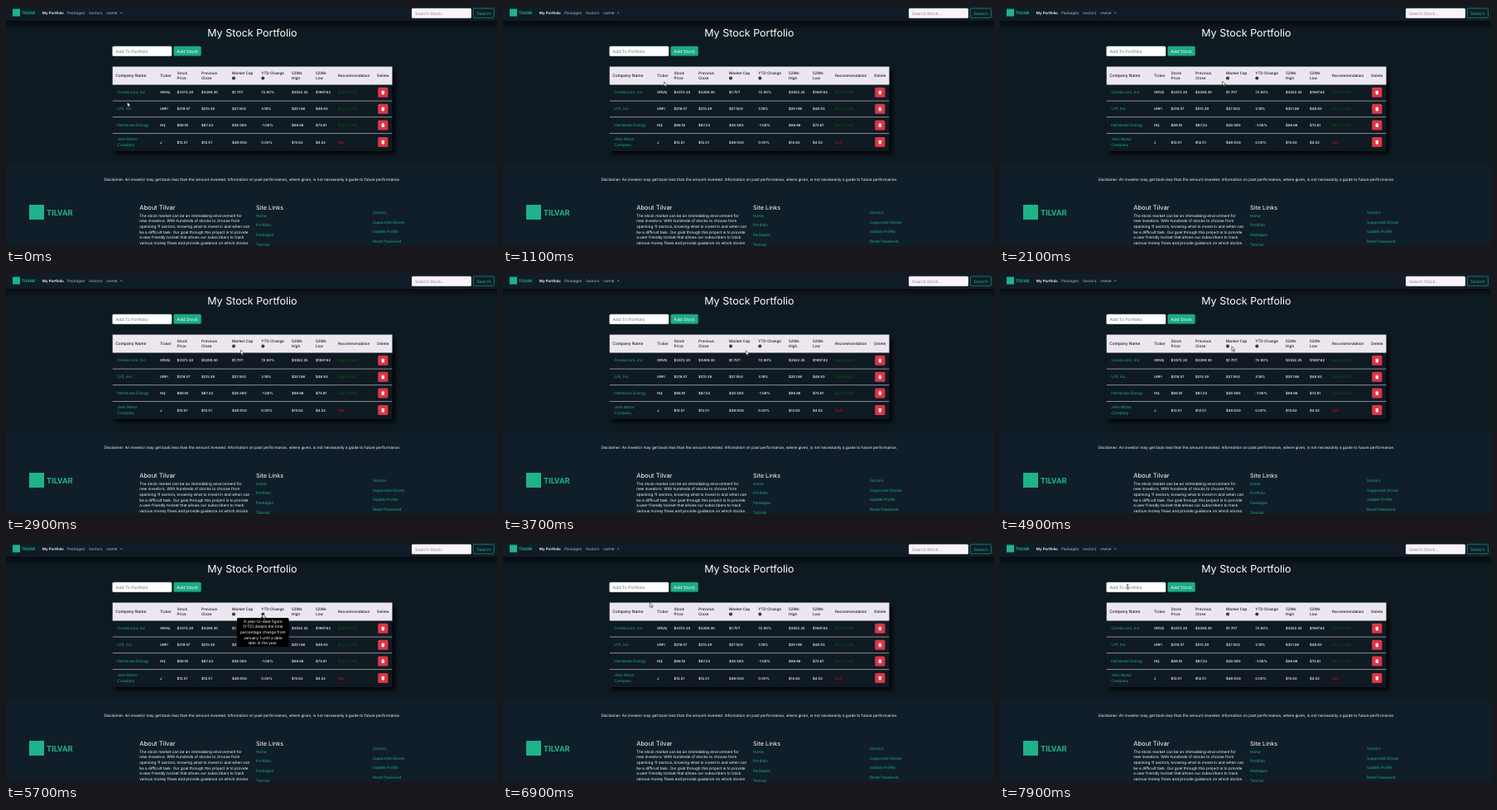
An HTML page that plays this animation: 593x291 px, repeating every 8 s.

```html
<!DOCTYPE html>
<html lang="en">
<head>
<meta charset="utf-8">
<title>My Stock Portfolio</title>
<style>
  html, body { margin: 0; width: 100%; height: 100%; overflow: hidden; background: #0e1a21; }
  svg { display: block; width: 593px; height: 291px; }
  text { font-family: Inter, "Open Sans", sans-serif; text-rendering: geometricPrecision; white-space: pre; }
</style>
</head>
<body>
<svg id="stage" viewBox="0 0 593 291" xmlns="http://www.w3.org/2000/svg">
  <defs>
    <linearGradient id="navShade" x2="0" y2="1">
      <stop offset="0" stop-color="#000" stop-opacity=".6"/>
      <stop offset="1" stop-color="#000" stop-opacity="0"/>
    </linearGradient>
    <filter id="blur" x="-10%" y="-10%" width="120%" height="125%"><feGaussianBlur stdDeviation="2"/></filter>
  </defs>
</svg>
<script>
const stage = document.getElementById('stage');
const GREEN = '#1fb389', WHITE = '#fff', INK = '#17171c', RED = '#dc3545';

function add(tag, attrs, parent = stage) {
  const el = document.createElementNS('http://www.w3.org/2000/svg', tag);
  for (const key in attrs) el.setAttribute(key, attrs[key]);
  parent.appendChild(el);
  return el;
}
const box = (x, y, width, height, fill, rx = 0, extra = {}, parent) =>
  add('rect', { x, y, width, height, fill, rx, ...extra }, parent);
function label(str, x, y, size, fill, extra = {}, parent) {
  const el = add('text', { x, y, 'font-size': size, fill, ...extra }, parent);
  el.textContent = str;
  return el;
}
const bold = weight => ({ 'font-weight': weight });
const centered = { 'text-anchor': 'middle' };

function brand(x, y, side, textX, baseline, size) {
  box(x, y, side, side, GREEN);
  label('TILVAR', textX, baseline, size, GREEN,
    { 'font-weight': 700, style: 'font-family: Roboto, sans-serif' });
}

function drawNav() {
  box(0, 18, 593, 10, 'url(#navShade)');
  box(0, 0, 593, 18, '#101c28');
  brand(8, 3.5, 9, 19, 10.2, 4.9);
  label('My Portfolio', 43.8, 10.4, 4.45, WHITE, bold(600));
  label('Packages', 74, 10.4, 4.6, '#b4bac0');
  label('Sectors', 100, 10.4, 4.5, '#b4bac0');
  label('owner', 121.3, 10.4, 4.7, '#b4bac0');
  add('path', { d: 'M137.8 7.8h2.8l-1.4 1.4z', fill: '#8b939b' });
  box(490, 2.7, 72, 12, '#fbf3fa', 1.5);
  label('Search Stock...', 494, 10.6, 5, '#85818c');
  box(564.3, 2.9, 25.2, 11.4, 'none', 1.5, { stroke: GREEN, 'stroke-width': .6 });
  label('Search', 577, 10.6, 5.3, GREEN, centered);
}

function drawForm() {
  label('My Stock Portfolio', 297.4, 36.8, 12.5, WHITE, centered);
  box(128.5, 48.8, 71.7, 12, WHITE, 1.5);
  label('Add To Portfolio', 132.5, 56.8, 5.15, '#6c757d');
  box(202.5, 48.8, 33.2, 11.8, '#1bab85', 1.5);
  label('Add Stock', 219.1, 56.5, 5.25, WHITE, centered);
}

function infoIcon(x, y) {
  add('circle', { cx: x, cy: y, r: 1.9, fill: INK });
  add('path', { d: `M${x} ${y - 1.2}v.5M${x} ${y - .3}v1.4`, stroke: WHITE, 'stroke-width': .55 });
}

function trashButton(y) {
  box(449.2, y - 6, 12.2, 12, RED, 1.5);
  add('path', { d: `M453.3 ${y - 1.7}h4v.7h-4zM454.5 ${y - 2.3}h1.6v.7h-1.6zM453.6 ${y - .7}h3.4l-.2 3.1h-3z`, fill: WHITE });
}

const columns = [132.3, 186, 206.5, 236, 273, 308.2, 345, 374, 401, 448.3];
const headers = ['Company Name', 'Ticker', 'Stock|Price', 'Previous|Close', 'Market Cap|',
  'YTD Change|', '52Wk|High', '52Wk|Low', 'Recommendation', 'Delete'];
const rows = [
  [104.8, 'Orvela.com, Inc.', 'ORVQ', '$3372.20', '$3299.30', '$1.70T', '72.90%', '$3552.25', '$1997.62', 'Buy (Hold)'],
  [124.8, 'Urfi, Inc.', 'URFI', '$218.57', '$215.39', '$27.55G', '3.18%', '$251.86', '$46.93', 'Buy (Hold)'],
  [144.4, 'Hartelisse Energy', 'HQ', '$86.18', '$87.24', '$29.59G', '-1.06%', '$96.66', '$73.61', 'Buy (Hold)'],
  [165, 'Jelm Motor|Company', 'J', '$12.51', '$12.51', '$49.93G', '0.00%', '$13.62', '$4.52', 'Sell']
];

// Lines separated by "|" are centred vertically on y.
function cell(str, x, y, size, fill, extra) {
  const lines = str.split('|');
  lines.forEach((line, i) =>
    label(line, x, y + 1.65 + (i - (lines.length - 1) / 2) * 6.6, size, fill, extra));
}

function drawTable() {
  box(132, 78, 338, 101.5, '#000', 0, { filter: 'url(#blur)', opacity: .85 });
  box(128.7, 73.5, 337.8, 102.5, '#0f1a23');
  box(128.7, 73.5, 337.8, 22, '#ece7ef');
  headers.forEach((h, i) => cell(h, columns[i], 84.3, i ? 4.6 : 4.85, INK, bold(500)));
  infoIcon(275, 87.5);
  infoIcon(310.3, 87.5);
  rows.forEach(([y, ...values]) => {
    values.forEach((value, i) => {
      if (i === 0) cell(value, 134.3, y, 4.6, GREEN);
      else if (i === 8) cell(value, columns[i], y, 4.6, value === 'Sell' ? '#e00c12' : '#075f0c');
      else cell(value, columns[i], y, 4.25, WHITE, bold(500));
    });
    trashButton(y);
  });
  [115, 134.7, 154.3].forEach(y => box(128.7, y - .3, 337.8, .7, '#b9bec4'));
}

function drawFooter() {
  box(0, 191.3, 593, 100, '#101e2a');
  label('Disclaimer: An investor may get back less than the amount invested. Information on past performance, where given, is not necessarily a guide to future performance.',
    297.4, 211.8, 4.6, WHITE, centered);
  brand(28, 241, 18, 49, 253.7, 9.7);
  label('About Tilvar', 161.2, 246.8, 7.6, WHITE);
  label('Site Links', 302, 246.8, 7.3, WHITE);
  ['The stock market can be an intimidating environment for',
   'new investors. With hundreds of stocks to choose from',
   'spanning 11 sectors, knowing what to invest in and when can',
   'be a difficult task. Our goal through this project is to provide',
   'a user friendly toolset that allows our subscribers to track',
   'various money flows and provide guidance on which stocks'
  ].forEach((line, i) => label(line, 161.2, 255.7 + i * 6.62, 4.65, WHITE));
  const links = (names, x, y) =>
    names.forEach((name, i) => label(name, x, y + i * 11.65, 4.55, GREEN));
  links(['Home', 'Portfolio', 'Packages', 'Tutorial'], 302, 255.7);
  links(['Sectors', 'Supported Stocks', 'Update Profile', 'Reset Password'], 443, 252);
}

function tooltip(x, lines) {
  const g = add('g', { opacity: 0 });
  add('path', { d: `M${x - 2.6} 92.2l2.6 -2.6l2.6 2.6z`, fill: '#000' }, g);
  box(x - 31.3, 92, 62.6, 35, '#000', 1.6, {}, g);
  lines.forEach((line, i) => label(line, x, 97.8 + i * 6.57, 4.7, WHITE, centered, g));
  return g;
}

drawNav();
drawForm();
drawTable();
drawFooter();

const capTip = tooltip(275, ['Market capitalization', 'refers to the total', 'dollar market value of', "a company's shares", 'of stock.']);
const ytdTip = tooltip(310.3, ['A year-to-date figure', '(YTD) details the total', 'percentage change from', 'January 1 until a date', 'later in the year.']);
const arrow = add('path', { d: 'M0 0V5.6L1.3 4.4L2.2 6.5L3.1 6.1L2.2 4.1H4z', fill: WHITE, stroke: '#000', 'stroke-width': .5 });
const beam = add('path', { d: 'M-1 -2.8H1M0 -2.8V2.8M-1 2.8H1', stroke: '#111', 'stroke-width': .6, fill: 'none' });

// Pointer stops: time, x, y
const route = [
  [0, 146.5, 116.5], [900, 186, 92], [1800, 255, 91], [2100, 268.7, 91], [2700, 282, 92],
  [3600, 293.5, 93], [3700, 293.3, 92.8], [4200, 275, 87], [4800, 275, 87], [4900, 280, 87.8],
  [5500, 310, 87.3], [5900, 310, 87.3], [6400, 205, 78], [6500, 205, 78],
  [6900, 177.3, 73.5], [7400, 161.5, 77], [7900, 154.2, 54.3]
];
const smooth = k => k * k * (3 - 2 * k);
const clamp = k => Math.max(0, Math.min(1, k));

function pointerAt(t) {
  const i = Math.max(1, route.findIndex(stop => stop[0] >= t));
  const [t0, x0, y0] = route[i - 1], [t1, x1, y1] = route[i];
  const k = smooth((t - t0) / (t1 - t0));
  return [x0 + (x1 - x0) * k, y0 + (y1 - y0) * k];
}
const fade = (t, from, to) => clamp((t - from) / 150) * clamp(1 - (t - to) / 100);

function render(ms) {
  const t = Math.floor(ms % 8000 / 100) * 100;
  const [x, y] = pointerAt(t);
  const overInput = y < 60;
  for (const [el, shown] of [[arrow, !overInput], [beam, overInput]]) {
    el.setAttribute('transform', `translate(${x.toFixed(2)} ${y.toFixed(2)})`);
    el.setAttribute('visibility', shown ? 'visible' : 'hidden');
  }
  capTip.setAttribute('opacity', fade(t, 4100, 4800));
  ytdTip.setAttribute('opacity', fade(t, 5400, 5950));
}

const start = performance.now();
(function tick() {
  render(performance.now() - start);
  requestAnimationFrame(tick);
})();
</script>
</body>
</html>
```
